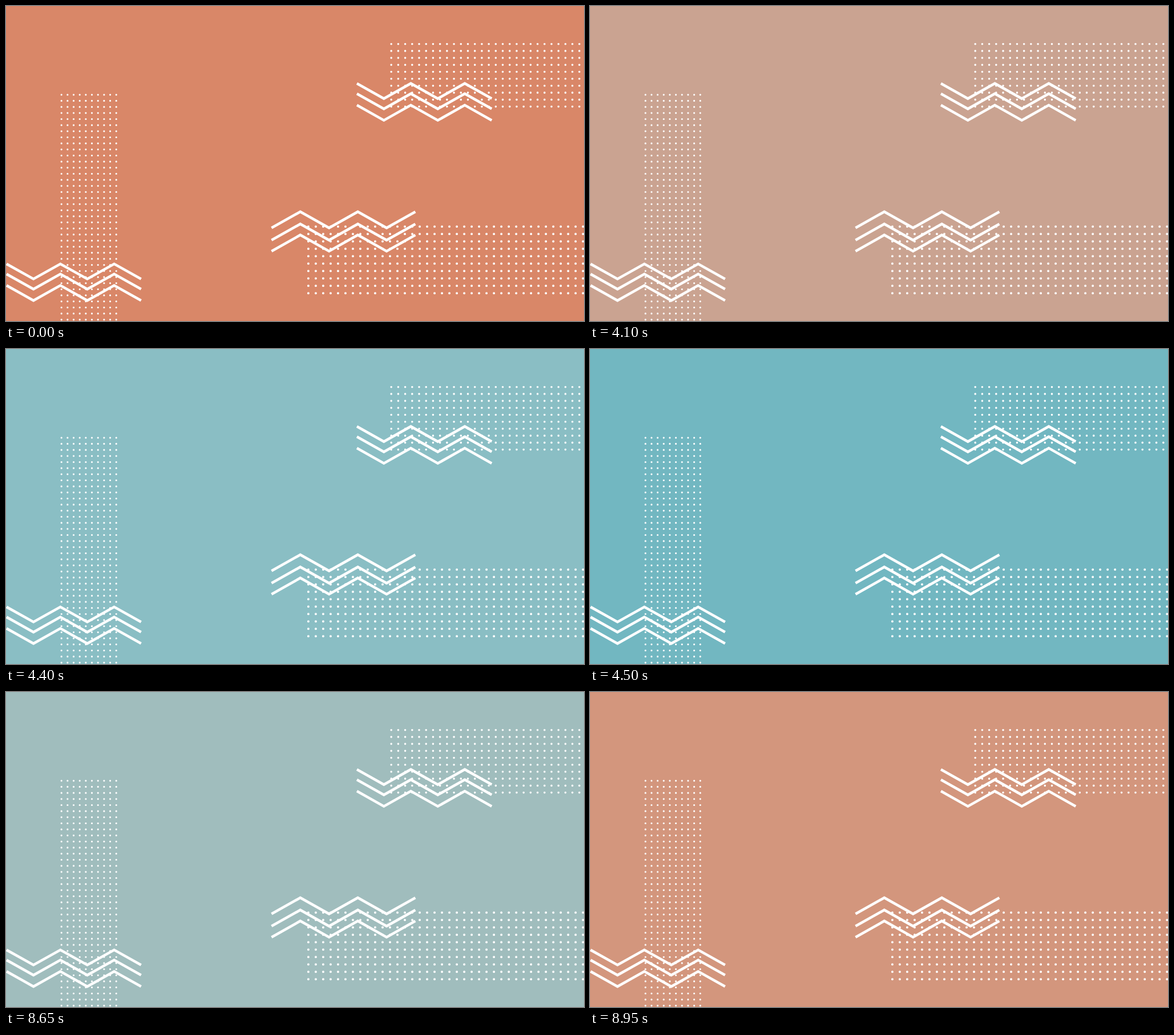
Recreate the animation shown at these times as an HTML page. Size 1013 px wide and 553 px high, loop 9 s.

```html
<!DOCTYPE html>
<html lang="en">
<head>
<meta charset="utf-8">
<title>Dots and zigzags</title>
<style>
  html, body { margin: 0; width: 100%; height: 100%; overflow: hidden; }
  body { animation: tint 9s step-end infinite; }
  svg { display: block; fill: none; stroke: #fff; }
  .dots { stroke-linecap: round; }
  .waves { stroke-width: 4.6; stroke-linejoin: miter; }

  /* Hard colour steps: terracotta to teal and back */
  @keyframes tint {
    0% { background: #d98768; }
    44.4444% { background: #d3967d; }
    45% { background: #caa391; }
    46.1111% { background: #beafa3; }
    46.6667% { background: #b1b7b1; }
    47.7778% { background: #a0bdbd; }
    48.8889% { background: #8abec4; }
    50% { background: #72b7c1; }
    95% { background: #8abec4; }
    96.1111% { background: #a0bdbd; }
    97.2222% { background: #b1b7b1; }
    98.3333% { background: #beafa3; }
    98.8889% { background: #caa391; }
    99.4444%, 100% { background: #d3967d; }
  }
</style>
</head>
<body>
<svg id="art" width="1013" height="553" viewBox="0 0 1013 553"></svg>
<script>
  const art = document.getElementById('art');

  function addPath(name, d, width) {
    const path = document.createElementNS('http://www.w3.org/2000/svg', 'path');
    path.setAttribute('class', name);
    path.setAttribute('d', d);
    if (width) path.setAttribute('stroke-width', width);
    art.append(path);
  }

  function dots(x, y, cols, rows, gap, size) {
    let d = '';
    for (let r = 0; r < rows; r++) {
      for (let c = 0; c < cols; c++) d += `M${x + c * gap} ${y + r * gap}h0`;
    }
    addPath('dots', d, size);
  }

  // Each line alternates between its start height and start height + rise.
  function waves(x, tops, step, rise) {
    for (const y of tops) {
      const points = [0, 1, 2, 3, 4, 5].map(i => `${x + i * step} ${y + (i % 2) * rise}`);
      addPath('waves', 'M' + points.join('L'));
    }
  }

  dots(97.2, 155.8, 10, 38, 10.67, 3.2);
  dots(675.2, 66.7, 28, 10, 12.21, 3.6);
  dots(529.9, 387.2, 38, 10, 13.01, 4);

  waves(615, [136, 153.9, 174.1], 47.25, 26.6);
  waves(1, [452.8, 470.6, 490.6], 47.15, 26.4);
  waves(465.4, [389.6, 411.1, 430.4], 50.4, -28.4);
</script>
</body>
</html>
```
